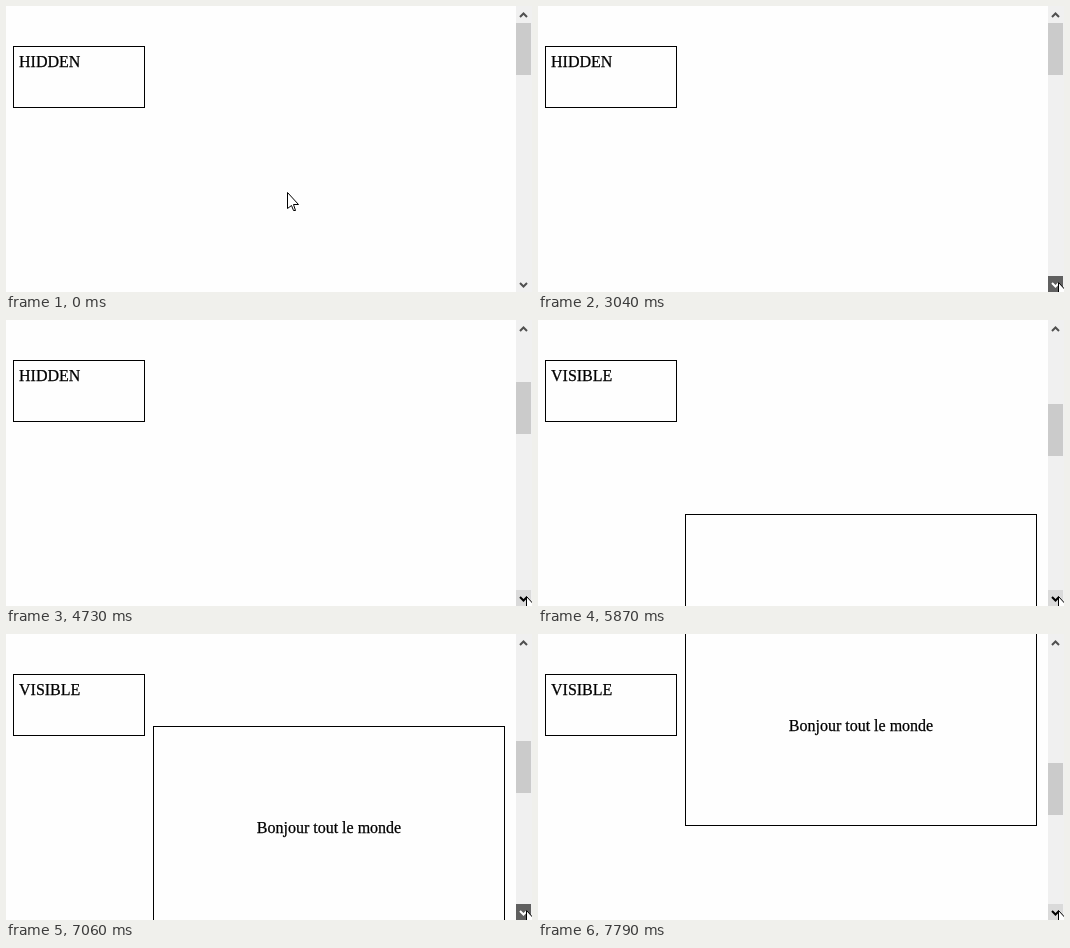
Write an HTML page with a canvas that moves like this. It is 526 by 286 pixels and loops after 8000 ms.

```html
<!DOCTYPE html>
<html lang="fr">
<head>
<meta charset="utf-8">
<title>Scroll visibility</title>
<style>
  html, body { margin: 0; width: 100%; height: 100%; overflow: hidden; background: #fefefe; }
  canvas { display: block; }
</style>
</head>
<body>
<canvas id="stage" width="526" height="286"></canvas>
<script>
const ctx = document.getElementById("stage").getContext("2d");
const LOOP = 8000;
const FRAME = 130;         // the picture advances in visible steps of this length
const CLICK_SCROLL = 51;   // page pixels per click on the down arrow
const CLICK_THUMB = 11.25; // scrollbar pixels per click
const CLICKS = [3040, 3480, 4030, 4580, 5030, 5610, 6170, 6630, 7060, 7630];

const lerp = (a, b, u) => a + (b - a) * u;
const smoothstep = u => u * u * (3 - 2 * u);
const easeOut = u => 1 - (1 - u) ** 2;

// Progress 0..1 of a pointer move that is seen in a given number of steps.
function stepped(time, start, steps) {
  const step = Math.floor((time - start) / FRAME) + 1;
  return Math.min(Math.max(step, 0), steps) / steps;
}

function pointerAt(time) {
  const sweep = smoothstep(stepped(time, 860, 6) ** 1.81);
  const reach = easeOut(stepped(time, 2010, 4));
  return {
    x: Math.round(lerp(lerp(281, 464, sweep), 520, reach)),
    y: Math.round(lerp(lerp(186, 270, sweep ** 2.5), 276, reach))
  };
}

function fillRect(color, x, y, w, h) {
  ctx.fillStyle = color;
  ctx.fillRect(x, y, w, h);
}

function frameBox(x, y, w, h) {
  ctx.strokeStyle = "#000";
  ctx.lineWidth = 1;
  ctx.strokeRect(x + 0.5, y + 0.5, w - 1, h - 1);
}

function label(text, x, y, align) {
  ctx.font = '16px "Liberation Serif", "Times New Roman", serif';
  ctx.textAlign = align;
  ctx.fillStyle = ctx.strokeStyle = "#000";
  ctx.lineWidth = 0.25;
  ctx.fillText(text, x, y);
  ctx.strokeText(text, x, y);
}

function chevron(y, direction, color) {
  ctx.beginPath();
  ctx.moveTo(514, y - 2 * direction);
  ctx.lineTo(517.5, y + 1.5 * direction);
  ctx.lineTo(521, y - 2 * direction);
  ctx.strokeStyle = color;
  ctx.lineWidth = 2;
  ctx.stroke();
}

function drawScrollbar(scrolled, hovered, pressed) {
  fillRect("#f0f0f0", 510, 0, 16, 286);
  fillRect("#cbcbcb", 510, Math.round(16.9 + CLICK_THUMB * scrolled), 15, 52);
  chevron(9, -1, "#505050");

  if (hovered) fillRect(pressed ? "#606060" : "#dadada", 510, 270, 15, 16);
  chevron(279, 1, pressed ? "#fff" : hovered ? "#000" : "#505050");
}

function drawPointer({ x, y }) {
  const outline = [[0, 0], [0, 16], [4, 13], [6, 18], [8, 18], [6, 12], [11, 12]];
  ctx.beginPath();
  for (const [dx, dy] of outline) ctx.lineTo(x + dx + 0.5, y + dy + 0.5);
  ctx.closePath();
  ctx.fillStyle = "#fff";
  ctx.fill();
  ctx.strokeStyle = "#000";
  ctx.lineWidth = 1;
  ctx.stroke();
}

function draw(time) {
  // A click first shows the pressed arrow, then the page moves as it is released.
  const scrolled = CLICKS.filter(click => time >= click + FRAME).length;
  const pressed = CLICKS.some(click => time >= click && time < click + FRAME);
  const pointer = pointerAt(time);
  const top = 500 - CLICK_SCROLL * scrolled;

  fillRect("#fefefe", 0, 0, 526, 286);
  frameBox(147, top, 352, 202);
  label("Bonjour tout le monde", 323, top + 107, "center");

  frameBox(7, 40, 132, 62);
  label(top < 286 ? "VISIBLE" : "HIDDEN", 13, 61, "left");

  drawScrollbar(scrolled, pointer.x >= 510, pressed);
  drawPointer(pointer);
}

let start;
function tick(now) {
  start ??= now;
  draw((now - start) % LOOP);
  requestAnimationFrame(tick);
}
draw(0);
requestAnimationFrame(tick);
</script>
</body>
</html>
```
